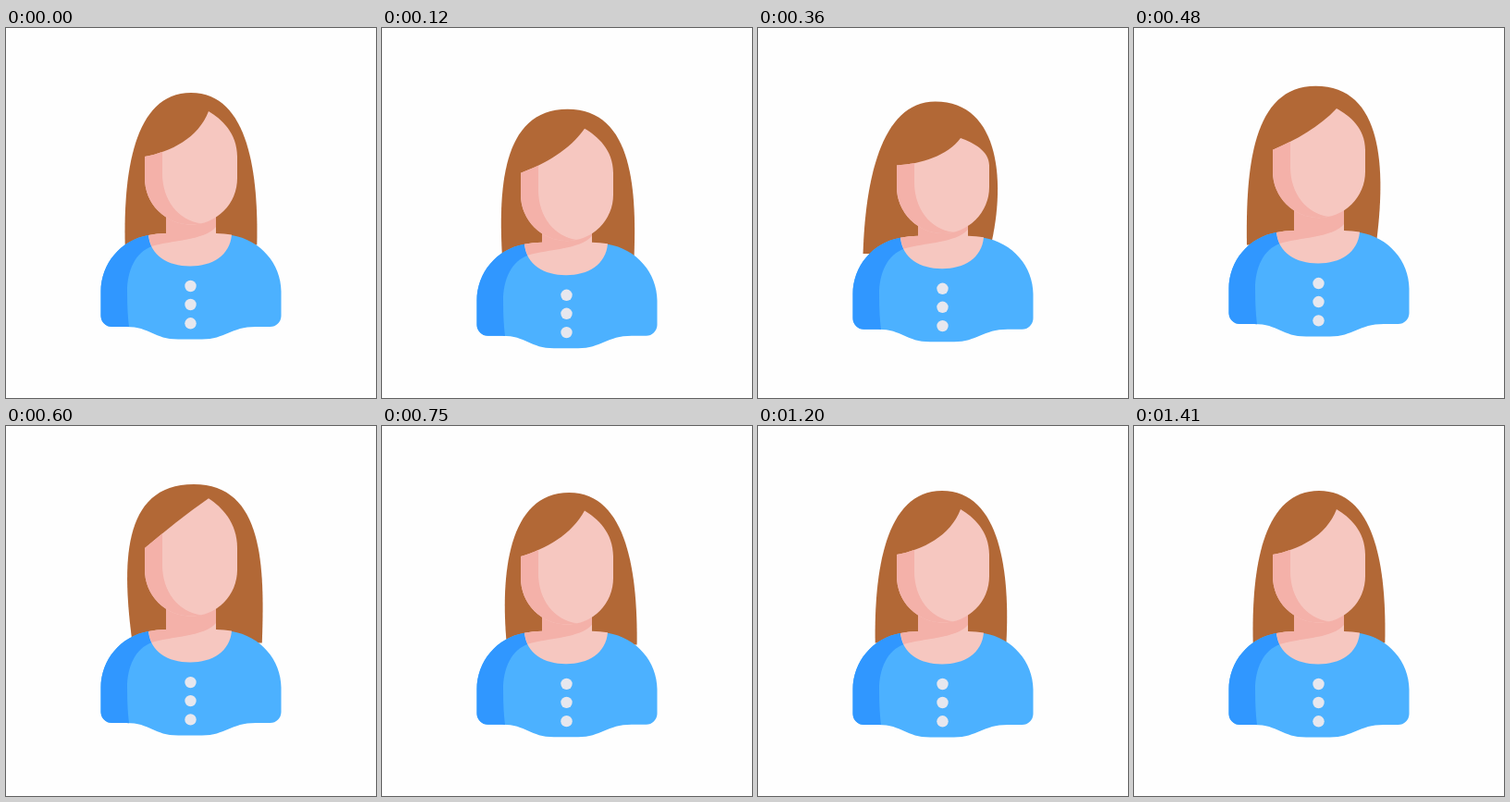
An HTML page for the animation above (3890 ms loop, 400 by 400 pixels).

```html
<!DOCTYPE html>
<html lang="en">
<head>
<meta charset="utf-8">
<title>Avatar bounce</title>
<style>
  html, body { margin: 0; width: 100%; height: 100%; overflow: hidden; background: #fefefe; }
  svg { display: block; width: 100vw; height: 100vh; }
  .hair { fill: #b26836; }
  .skin { fill: #f6c7c0; }
  .shade { fill: #f4b1a9; }
  .shirt { fill: #4cb1ff; }
  .sleeve { fill: #3097ff; }
  .button { fill: #e7e7ee; }
</style>
</head>
<body>
<svg viewBox="0 0 400 400">
  <defs>
    <clipPath id="faceClip"><path id="faceEdge"/></clipPath>
  </defs>
  <path id="hair" class="hair"/>
  <g id="body">
    <path class="shirt" d="M102.5 285 C102.5 255 124 229 154 224 H244 C275 229 297.5 255 297.5 285 V311 A12 12 0 0 1 285.5 323 H270 C243 323 237 336.5 212 336.5 H186 C160 336.5 156 323 130 323 H114.5 A12 12 0 0 1 102.5 311 Z"/>
    <path class="sleeve" d="M102.5 285 C102.5 255 124 229 154 224 L158 236 C140 242 131 262 131 285 Q131 308 133 323.1 L130 323 H114.5 A12 12 0 0 1 102.5 311 Z"/>
    <path class="skin" d="M173 190 V222 Q163 222 154 224 C156 246 175 257.5 199 257.5 C223 257.5 242 246 244 223.5 Q236 222 227 222 V190 Z"/>
    <path class="shade" d="M173 190 V222 Q163 222 154 224 Q155 230 157.5 236 C180 229 214 230 227 215 V190 Z"/>
    <circle class="button" cx="199.5" cy="279" r="6.2"/>
    <circle class="button" cx="199.5" cy="299" r="6.2"/>
    <circle class="button" cx="199.5" cy="319.3" r="6.2"/>
  </g>
  <path id="face" class="skin"/>
  <g clip-path="url(#faceClip)">
    <path id="cheek" class="shade" d="M140 50 H169 V157 C169 186 186 208 211 211.3 V230 H140 Z"/>
  </g>
</svg>
<script>
const LOOP = 3890, STEP = 30, END = 1410;
const $ = id => document.getElementById(id);

// Cosine-eased swings from one [time, extreme] to the next.
const swing = (...keys) => t => {
  const i = keys.findIndex(k => k[0] > t);
  if (i < 0) return keys.at(-1)[1];
  if (i === 0) return keys[0][1];
  const [t0, a] = keys[i - 1], [t1, b] = keys[i];
  return a + (b - a) * (1 - Math.cos(Math.PI * (t - t0) / (t1 - t0))) / 2;
};

// The head's bounce shrinks to a third and flips at each turn.
const head = swing([0, 0], [200, 27], [525, -9], [800, 3], [1100, 0]);
const body = swing([0, 0], [200, 15], [460, -3], [800, 0]);
const flop = swing([80, 0], [340, 20], [580, -5], [800, 0]);
const curl = swing([0, 1], [200, .35], [380, .75], [600, -.1], [820, 1]);
const lean = swing([0, 0], [200, 2], [365, -18.5], [630, 7.5], [1040, -4], [END, 0]);
const swell = swing([0, 0], [200, 14], [380, 2], [590, 15], [800, 0]);

function hairPath(h, lean, swell) {
  const top = 70 + h, mid = 160 + h, hem = 234.5 + Math.max(0, h);
  const pinch = .18 * Math.abs(lean), bulk = pinch + .18 * swell;
  // Half widths about an axis that leans more towards the tips.
  const tip = 71.3 - pinch, low = 73 + bulk, high = 63 + swell;
  const x = (share, half) => 200 + share * lean + half;
  return `M${x(1, -tip)} ${hem} C${x(.4, -low)} ${mid} ${x(.17, -high)} ${top} ${x(.45, 0)} ${top}` +
    ` C${x(.17, high)} ${top} ${x(.4, low)} ${mid} ${x(1, tip)} ${hem} Z`;
}

function facePath(h, flop, curl) {
  const side = 139 + h, peak = 90 + h + flop, jaw = 162.5 + h;
  const mix = u => side + (peak - side) * u;
  return `M150 ${side} C${173 + 5 * curl} ${mix(1 / 3) + 11.3 * curl}` +
    ` ${196 + 12 * curl} ${mix(2 / 3) + 12.7 * curl} 219 ${peak}` +
    ` C233 ${mix(.83)} 250 ${mix(.52)} 250 ${side} V${jaw} A50 50 0 0 1 150 ${jaw} Z`;
}

function draw(t) {
  const h = head(t), face = facePath(h, flop(t), curl(t));
  $('body').setAttribute('transform', `translate(0 ${body(t)})`);
  $('cheek').setAttribute('transform', `translate(0 ${h})`);
  $('hair').setAttribute('d', hairPath(h, lean(t), swell(t)));
  $('face').setAttribute('d', face);
  $('faceEdge').setAttribute('d', face);
}

const start = performance.now();
function tick() {
  const t = (performance.now() - start) % LOOP;
  draw(Math.min(END, Math.floor(t / STEP) * STEP));
  requestAnimationFrame(tick);
}
tick();
</script>
</body>
</html>
```
